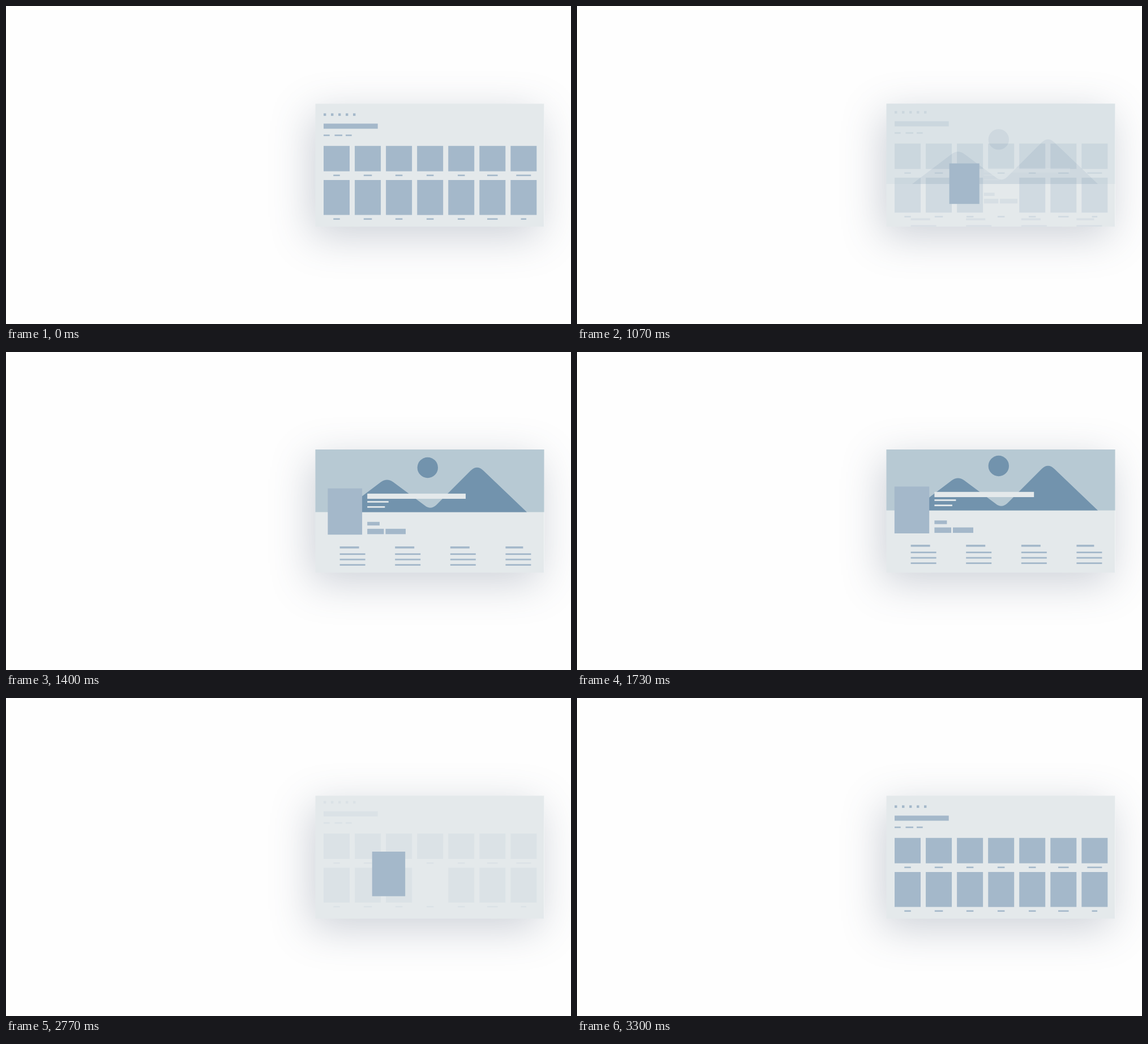
An HTML page for the animation above (4.13 s loop, 998 by 561 pixels).

```html
<!DOCTYPE html>
<html lang="en">
<head>
<meta charset="utf-8">
<title>Gallery to detail transition</title>
<style>
  html, body { margin: 0; width: 100%; height: 100%; overflow: hidden; background: #fefefe; }
  .shadow {
    position: absolute; left: 546.5px; top: 172.5px; width: 404px; height: 216.8px;
    box-shadow: -8px 17px 72px rgba(70, 84, 110, .27);
  }
  svg { position: absolute; left: 0; top: 0; display: block; }
  .card, .light { fill: #e4e9eb; }
  .bar { fill: #a4b8ca; }
  .hero { fill: #b7c9d3; }
  .peak { fill: #7293ad; }
</style>
</head>
<body>
<div class="shadow"></div>
<svg width="998" height="561" viewBox="0 0 998 561">
  <clipPath id="frame"><rect x="546.5" y="172" width="404" height="217.3"/></clipPath>
  <rect class="card" x="546.5" y="172.5" width="404" height="216.8"/>
  <g clip-path="url(#frame)">
    <g id="grid"></g>
    <g id="detail">
      <rect class="hero" x="546" y="100" width="405" height="179.5"/>
      <path class="peak" d="M592 279.5L662 226.5Q673 218.5 684 226.5L740 268Q750 276 760 267L821 206Q832 195.5 843 206L920 279.5Z"/>
      <circle class="peak" cx="744.8" cy="201" r="18.2"/>
    </g>
  </g>
  <g id="mover">
    <g id="text"></g>
    <rect class="bar" x="560.8" y="237.4" width="61.4" height="82.6"/>
  </g>
  <path id="cursor" d="M0 0V15.5L3.7 12.1L6.2 17.7L8.7 16.6L6.2 11.2H11.3Z"
        fill="#4d5b66" stroke="#fff" stroke-width=".8"/>
</svg>
<script>
  const LOOP = 4130, CLOSE = 2630, SMALL = .748;
  const $ = id => document.getElementById(id);
  const grid = $('grid'), detail = $('detail'), mover = $('mover'), text = $('text'), cursor = $('cursor');

  function bar(parent, x, y, w, h, cls = 'bar') {
    const r = document.createElementNS('http://www.w3.org/2000/svg', 'rect');
    Object.entries({ x, y, width: w, height: h, class: cls })
      .forEach(([k, v]) => r.setAttribute(k, v));
    parent.append(r);
  }

  // Gallery page; the fourth lower tile is the moving one
  for (let i = 0; i < 5; i++) bar(grid, 561 + 13 * i, 189.4, 4.4, 4.4);
  bar(grid, 561, 207.5, 95.7, 9);
  for (let i = 0; i < 3; i++) bar(grid, 561 + 19.5 * i, 226.8, i === 1 ? 13.5 : 10.7, 2.6);
  [11.5, 14.5, 12.5, 12.5, 12.5, 18.5, 26].forEach((w, i) => {
    const x = 561 + 55.05 * i, mid = x + 23, low = i === 6 ? 9.5 : w;
    bar(grid, x, 246.8, 46, 44.8);
    if (i !== 3) bar(grid, x, 307, 46, 61.6);
    bar(grid, mid - w / 2, 297.5, w, 2.6);
    bar(grid, mid - low / 2, 374.5, low, 2.6);
  });

  // Detail page
  for (let i = 0; i < 4; i++) {
    const x = 589.6 + 97.6 * i;
    bar(detail, x, 340, i === 3 ? 31 : 34, 3.6);
    for (let j = 0; j < 3; j++) bar(detail, x, 352.2 + 9.5 * j, 45, 2.8);
  }
  bar(text, 631.4, 246.8, 175.8, 9.2, 'light');
  for (let i = 0; i < 2; i++) bar(text, 631.4, 260 + 9.2 * i, 38 - 6.5 * i, 2.8, 'light');
  bar(text, 631.4, 297.2, 22, 6.4);
  for (let i = 0; i < 2; i++) bar(text, 631.4 + 32.6 * i, 309.5, 29.6 + 6.4 * i, 9.6);

  const mix = (a, b, p) => a + (b - a) * p;
  const span = (t, from, to) => Math.min(1, Math.max(0, (t - from) / (to - from)));

  // cubic-bezier(a, 0, b, 1)
  function ease(x, a, b) {
    let lo = 0, hi = 1;
    for (let i = 0; i < 24; i++) {
      const s = (lo + hi) / 2, r = 1 - s;
      if (3 * r * r * s * a + 3 * r * s * s * b + s * s * s < x) lo = s; else hi = s;
    }
    return lo * lo * (3 - 2 * lo);
  }

  // Gallery to detail
  function opening(t) {
    const p = span(t, 817, 1673), move = ease(p, .51, 0);
    return {
      move,
      scale: mix(SMALL, 1, ease(p, .48, 0)),
      rise: 60 * (1 - ease(p, .47, .04)),
      alpha: span(t, 1022, 1277),
      gridAlpha: 1 - span(t, 815, 1180),
      gridY: -10 * move
    };
  }

  // Detail back to gallery
  function closing(t) {
    const move = 1 - ease(span(t, 2590, 3300), .23, .075), back = span(t, 2720, 3120);
    return {
      move,
      scale: mix(1.014, SMALL, ease(span(t, 2600, 3300), .17, .68)),
      rise: 60 * (1 - move),
      alpha: 1 - span(t, 2615, 2740),
      gridAlpha: back,
      gridY: -10 * (1 - back) ** 2
    };
  }

  function draw(t) {
    const s = t < CLOSE ? opening(t) : closing(t);
    const x = mix(749.2, 591.5, s.move), y = mix(337.8, 278.7, s.move);

    mover.setAttribute('transform', `translate(${x} ${y}) scale(${s.scale}) translate(-591.5 -278.7)`);
    text.setAttribute('opacity', s.alpha);
    detail.setAttribute('opacity', s.alpha);
    detail.setAttribute('transform', `translate(0 ${s.rise})`);
    grid.setAttribute('opacity', s.gridAlpha);
    grid.setAttribute('transform', `translate(0 ${s.gridY})`);

    const go = ease(span(t, 190, 670), .42, .58);
    cursor.setAttribute('transform', `translate(${mix(822, 745, go)} ${mix(333, 319, go)})`);
    cursor.setAttribute('opacity', span(t, 200, 300) - span(t, 830, 930));
  }

  const start = performance.now();
  function tick() {
    draw((performance.now() - start) % LOOP);
    requestAnimationFrame(tick);
  }
  draw(0);
  requestAnimationFrame(tick);
</script>
</body>
</html>
```
